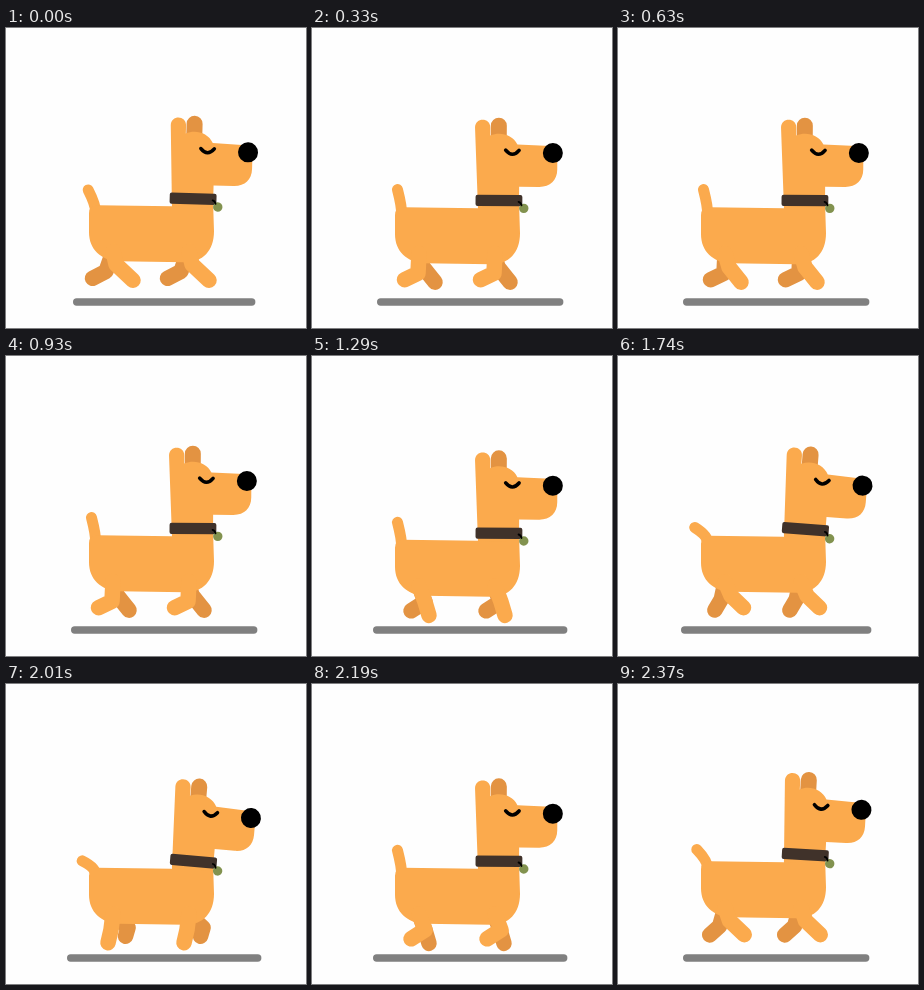
These frames come from a looping animation (300x300 px, 2400 ms). An HTML page:

```html
<!DOCTYPE html>
<html lang="en">
<head>
<meta charset="utf-8">
<title>Walking dog</title>
<style>
  html, body { margin: 0; width: 100%; height: 100%; overflow: hidden; background: #fefefe; }
  svg { display: block; width: 100vw; height: 100vh; }
  .coat { fill: #fbaa4d; }
  .line { fill: none; stroke: #fbaa4d; stroke-linecap: round; stroke-linejoin: round; }
  .far { stroke: #e39342; }
  .leg { stroke-width: 15.5; }
</style>
</head>
<body>
<svg viewBox="0 0 300 300">
  <path id="ground" class="line" style="stroke:#808080" stroke-width="7.4"/>
  <g id="dog">
    <path id="hindFar" class="line far leg"/>
    <path id="foreFar" class="line far leg"/>
    <path id="tail" class="line" stroke-width="11"/>
    <path class="coat" d="M83 8Q83 0 91 0L166 1V-5H207L208 26C208 46 196 57.3 179 57L112 56C95 55 83 44 83 27Z"/>
    <path id="hindNear" class="line leg"/>
    <path id="foreNear" class="line leg"/>
    <g id="head">
      <path class="line far" stroke-width="16" d="M186.3-81.5V-62"/>
      <path class="coat" d="M162.5-79.5C162.5-90 177.8-90 177.8-79.5V-71.5C187-76 200-73 205-62.8L238-61.5Q245-61 245-54V-38C245-27 238-20.5 227-20.5H207V2H166Z"/>
      <circle cx="240.5" cy="-54.5" r="10"/>
      <path d="M193.3-57Q200-49 206.7-57" fill="none" stroke="#000" stroke-width="3.6" stroke-linecap="round"/>
      <rect x="163.5" y="-12.3" width="46.8" height="11.3" rx="2" fill="#40322a"/>
      <circle cx="211.8" cy="1" r="4.7" fill="#82924f"/>
      <path d="M206.5-5.5Q209-5 209.5-2" fill="none" stroke="#000" stroke-width="1.8" stroke-linecap="round"/>
    </g>
  </g>
</svg>
<script>
const LOOP = 2400, STRIDE = 600, BOB = 300, STEP = 30;
const $ = id => document.getElementById(id);
const draw = (id, d) => $(id).setAttribute('d', d);
const move = (id, value) => $(id).setAttribute('transform', value);

// time, knee x, knee y, toe x, toe y
const gait = [
  [0, 110, 59, 127, 75],
  [30, 111, 60, 123, 75],
  [90, 113, 62, 117, 75.5],
  [210, 105, 62, 102, 75],
  [300, 100, 66, 86.5, 73],
  [330, 106, 66, 92.5, 72.5],
  [390, 113, 62, 99, 71],
  [510, 122, 60, 119.5, 68.5],
  [540, 113, 60, 125.5, 72],
  [600, 110, 59, 127, 75]
];

function leg(id, t, shift) {
  t %= STRIDE;
  const i = gait.findIndex(k => k[0] > t);
  const a = gait[i - 1], b = gait[i];
  const u = (t - a[0]) / (b[0] - a[0]);
  const [, kx, ky, tx, ty] = a.map((v, n) => v + (b[n] - v) * u);
  draw(id, `M${107 + shift} 46L${kx + shift} ${ky}L${tx + shift} ${ty}`);
}

function render(t) {
  const p = t % BOB / BOB;
  const a = p * 2 * Math.PI;
  const sway = Math.cos(a - 1.4 * Math.PI);
  const y = 182.3 - 5.1 * Math.cos(a) + 0.5 * Math.sin(a)
    + 0.1 * Math.cos(2 * a) + 0.7 * Math.sin(2 * a);
  move('dog', `translate(0 ${y})`);
  move('head', `rotate(${2.4 + 2.5 * sway} 186 0)`);

  const half = 87.5 + 10 * (1 - Math.abs(1 - 2 * p));
  draw('ground', `M${158.2 - half} 274H${158.2 + half}`);

  const tilt = (47 + 23 * sway) * Math.PI / 180;
  draw('tail', `M89.5 7Q90 0 ${95 - 20 * Math.sin(tilt)} ${-20 * Math.cos(tilt)}`);

  leg('hindNear', t, 0);
  leg('foreNear', t, 76);
  leg('hindFar', t + STRIDE / 2, 0);
  leg('foreFar', t + STRIDE / 2, 75);
}

function tick() {
  const t = performance.now() % LOOP;
  render(Math.floor(t / STEP) * STEP);
  requestAnimationFrame(tick);
}
render(0);
requestAnimationFrame(tick);
</script>
</body>
</html>
```
